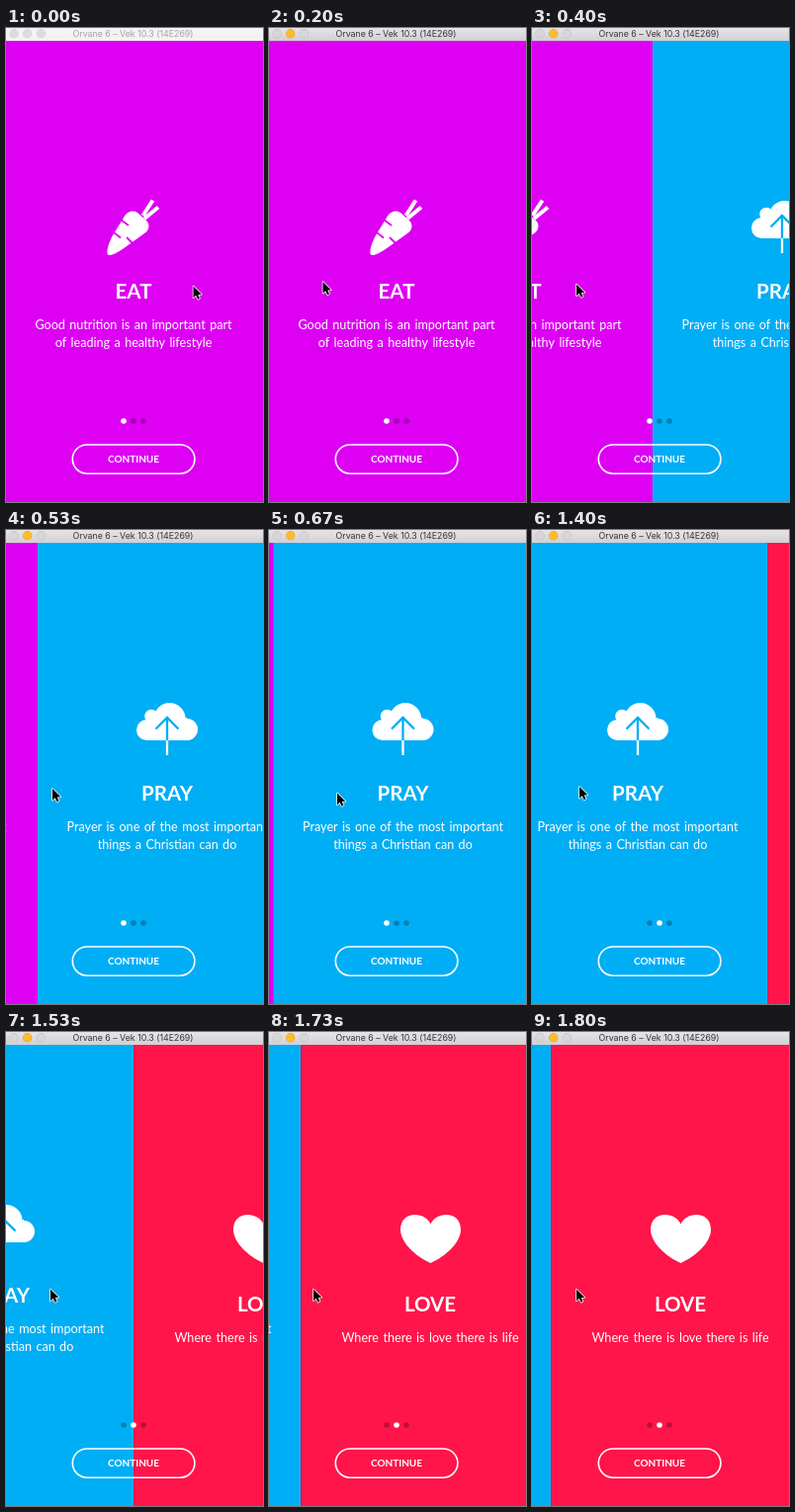
An HTML page with a canvas that plays this animation: 260x480 px, repeating every 1870 ms.

```html
<!DOCTYPE html>
<html lang="en">
<head>
<meta charset="utf-8">
<title>Onboarding</title>
<style>
html, body { margin: 0; width: 100%; height: 100%; overflow: hidden; }
canvas { display: block; width: 260px; height: 480px; }
</style>
</head>
<body>
<canvas id="stage"></canvas>
<script>
const W = 260, H = 480, LOOP = 1870, PAGE = 262, MID = 129, BAR = 13;
const canvas = document.getElementById('stage');
const ctx = canvas.getContext('2d');
const dpr = window.devicePixelRatio || 1;
canvas.width = W * dpr;
canvas.height = H * dpr;

// [time, value...] keys, joined by straight segments
const scrollKeys = [
  [200, 0], [270, 22], [330, 76], [400, 138], [530, 228], [600, 246], [670, 255.5],
  [730, 259.5], [800, 262], [1330, 262], [1400, 284], [1470, 335], [1530, 393],
  [1600, 437], [1670, 470], [1730, 490], [1800, 503]
];
const cursorKeys = [
  [0, 189.5, 261.5], [70, 180, 261], [130, 122, 258.5], [200, 54.5, 257], [270, 47, 259],
  [400, 45, 259.5], [530, 47, 262], [600, 55, 265], [670, 69, 266.5], [800, 121, 266],
  [930, 158, 264], [1070, 168, 263.5], [1200, 160, 262], [1330, 62, 259], [1400, 48, 260],
  [1530, 45, 260.5]
];

function at(keys, t) {
  const i = keys.findIndex(k => k[0] > t);
  if (i === 0) return keys[0].slice(1);
  if (i < 0) return keys[keys.length - 1].slice(1);
  const a = keys[i - 1], b = keys[i], p = (t - a[0]) / (b[0] - a[0]);
  return a.slice(1).map((v, j) => v + (b[j + 1] - v) * p);
}

// The picture advances 15 times a second, with one skipped step
function stepTime(ms) {
  let n = Math.floor((ms + 4) * 15 / 1000);
  if (n === 7) n = 6;
  return Math.round(n * 100 / 15) * 10;
}

function text(str, x, y, font, color = '#fff', wordGap = 0) {
  ctx.font = font;
  ctx.fillStyle = color;
  ctx.textAlign = 'center';
  ctx.wordSpacing = wordGap + 'px';
  ctx.fillText(str, x, y);
}

function disc(x, y, r, color) {
  ctx.fillStyle = color;
  ctx.beginPath();
  ctx.arc(x, y, r, 0, 7);
  ctx.fill();
}

function line(points, width, color) {
  ctx.strokeStyle = color;
  ctx.lineWidth = width;
  ctx.beginPath();
  points.forEach(p => ctx.lineTo(p[0], p[1]));
  ctx.stroke();
}

const carrotBody = new Path2D('M103 229.5C101 227 104 217 108 210L119 192C122 186 128 184 133 187L142 195C146 199 145 205 140 208L122 221C114 227 106 231.5 103 229.5Z');
const heartShape = new Path2D('M129.5 234C114 227 99 213 99 200C99 190 106 185 113.5 185C121 185 127 189 129.5 194.5C132 189 138 185 145.5 185C153 185 160 190 160 200C160 213 145 227 129.5 234Z');
const arrowShape = new Path2D('M0 0V11.7L2.7 9.2L4.6 13.2L6.5 12.4L4.8 8.4L8.3 8.2Z');

function carrot(bg) {
  ctx.fillStyle = '#fff';
  ctx.fill(carrotBody);
  line([[138.5, 190], [148.5, 174.5]], 4, '#fff');
  line([[140, 193], [154, 181.5]], 4, '#fff');
  line([[116, 194], [124, 200]], 1.8, bg);
  line([[109, 207], [116, 212.5]], 1.8, bg);
  line([[122, 212], [128, 218]], 1.8, bg);
}

function cloud(bg) {
  disc(131.5, 191, 16, '#fff');
  disc(113, 188.5, 6.8, '#fff');
  disc(108.5, 202.5, 10.5, '#fff');
  disc(149, 202, 11, '#fff');
  ctx.fillRect(108, 190, 41, 23);
  line([[129, 189], [129, 213]], 2.3, bg);
  line([[117.5, 201.5], [129, 190], [140.5, 201.5]], 2.3, bg);
  line([[129, 213], [129, 228]], 2.3, '#fff');
}

function heart() {
  ctx.fillStyle = '#fff';
  ctx.fill(heartShape);
}

const pages = [
  { bg: '#de00f3', icon: carrot, title: 'EAT', y: 274,
    lines: ['Good nutrition is an important part', 'of leading a healthy lifestyle'] },
  { bg: '#00aef5', icon: cloud, title: 'PRAY', y: 274,
    lines: ['Prayer is one of the most important', 'things a Christian can do'] },
  { bg: '#ff1549', icon: heart, title: 'LOVE', y: 282.5,
    lines: ['Where there is love there is life'] }
];

function drawPage(page, x) {
  if (x > PAGE || x < -PAGE) return;
  ctx.save();
  ctx.translate(x, 0);
  ctx.fillStyle = page.bg;
  ctx.fillRect(-2, BAR, PAGE + 0.5, H - BAR);
  page.icon(page.bg);
  text(page.title, MID, page.y, '700 20.5px Lato, sans-serif');
  page.lines.forEach((s, i) =>
    text(s, MID, page.y + 31 + i * 18, '400 12.6px Lato, sans-serif', '#fff', 1.2));
  ctx.restore();
}

function drawControls(current) {
  for (let i = 0; i < 3; i++) {
    disc(119 + i * 10, 398, 2.8, i === current ? '#fff' : 'rgba(0,0,0,.27)');
  }
  ctx.strokeStyle = '#fff';
  ctx.lineWidth = 1.6;
  ctx.beginPath();
  ctx.roundRect(67.3, 422, 123.6, 29.2, 14.6);
  ctx.stroke();
  text('CONTINUE', MID, 440, '700 10px Lato, sans-serif');
}

function drawBar(active) {
  const g = ctx.createLinearGradient(0, 0, 0, BAR);
  g.addColorStop(0, active ? '#e6e4e6' : '#f5f4f5');
  g.addColorStop(1, active ? '#d2d0d2' : '#f2f1f2');
  ctx.fillStyle = g;
  ctx.fillRect(0, 0, W, BAR);
  [8, 21.7, 35.5].forEach((x, i) => {
    const lit = active && i === 1;
    disc(x, 5.7, 4.6, lit ? '#dfa023' : active ? '#bdbbbd' : '#d2d0d2');
    disc(x, 5.7, 4.1, lit ? '#fdbc2e' : active ? '#d8d6d8' : '#dddbdd');
  });
  text('Orvane 6 – Vek 10.3 (14E269)', 128.5, 9.2, '400 8.8px Inter, sans-serif',
    active ? '#363536' : '#a5a3a5');
}

function drawCursor(x, y) {
  ctx.save();
  ctx.translate(x, y);
  ctx.lineJoin = 'round';
  ctx.lineWidth = 1.5;
  ctx.strokeStyle = '#fff';
  ctx.stroke(arrowShape);
  ctx.fillStyle = '#000';
  ctx.fill(arrowShape);
  ctx.restore();
}

function draw(now) {
  const t = stepTime(now % LOOP);
  const [scroll] = at(scrollKeys, t);
  ctx.setTransform(dpr, 0, 0, dpr, 0, 0);
  pages.forEach((p, i) => drawPage(p, i * PAGE - scroll));
  drawControls(t >= 800 ? 1 : 0);
  drawBar(t >= 70);
  drawCursor(...at(cursorKeys, t));
}

const start = performance.now();
function tick() {
  draw(performance.now() - start);
  requestAnimationFrame(tick);
}
tick();
</script>
</body>
</html>
```
